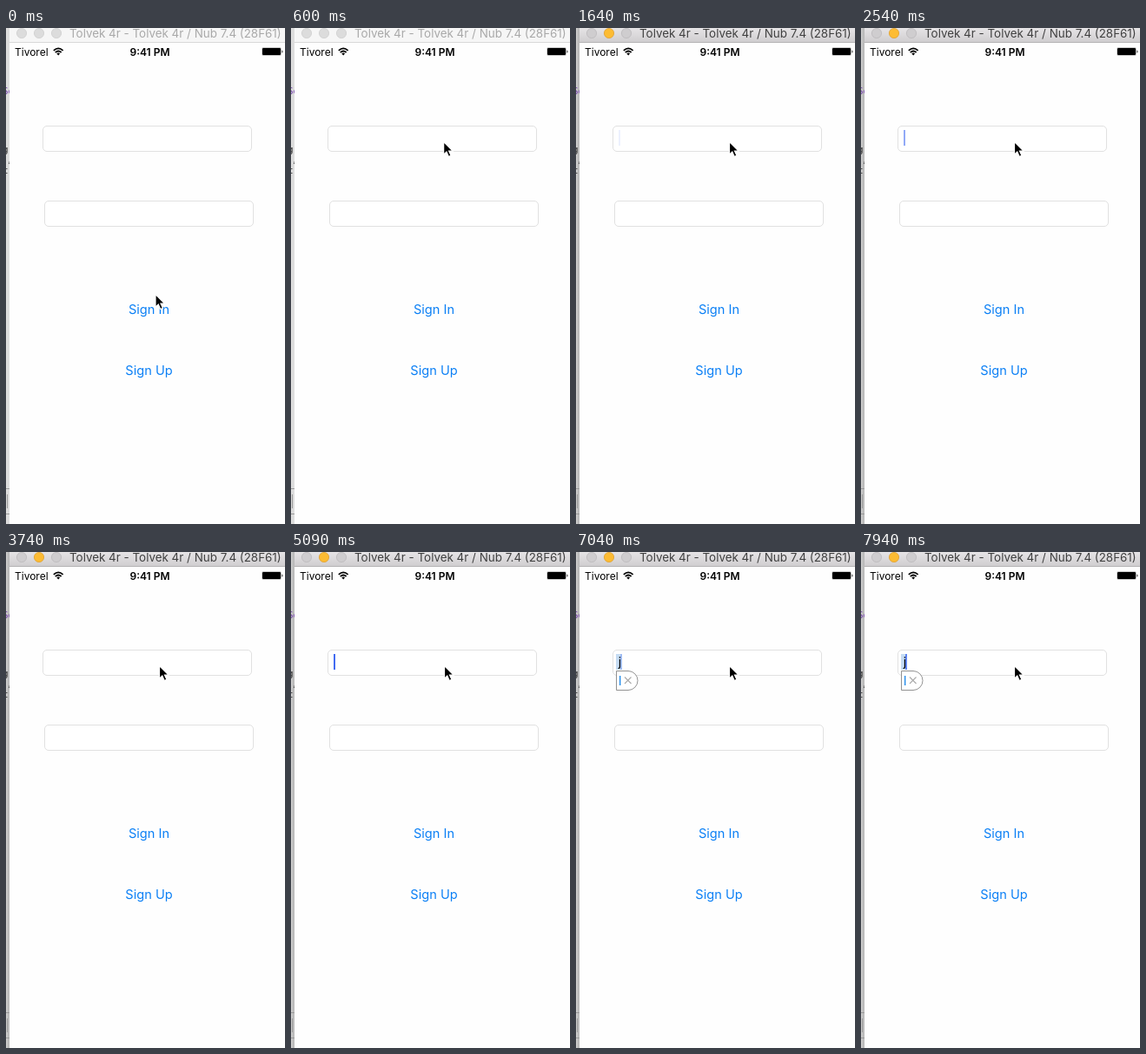
Write an HTML page that moves like this. It is 321 by 569 pixels and loops after 8 s.

```html
<!DOCTYPE html>
<html lang="en">
<head>
<meta charset="utf-8">
<title>Sign in form</title>
<style>
  html, body { margin: 0; width: 100%; height: 100%; overflow: hidden; background: #fff; }
  svg { display: block; width: 321px; height: 569px; }
  text { font-family: Inter, Roboto, sans-serif; }
  .field { fill: #fff; stroke: #e1e1e1; }
  .link { font-size: 14.6px; fill: #0a7ff5; text-anchor: middle; }
  .code { font: 11px "DejaVu Sans Mono", monospace; fill: #222; }

  #back { fill: #dcdcdc; }
  #title { fill: #f6f6f6; }
  #edge { stroke: #d8d8d8; }
  #name { fill: #a9a9a9; }
  #lights { fill: #dcdcdc; stroke: #cfcfcf; stroke-width: .8; }
  .active #back { fill: url(#shade); }
  .active #title { fill: url(#bar); }
  .active #edge { stroke: #b5b3b5; }
  .active #name { fill: #404040; }
  .active #lights { fill: #cfcdcf; stroke: #bbb9bb; }
  .active #mini { fill: #fdbc33; stroke: #e0a030; }
</style>
</head>
<body>
<svg id="stage" viewBox="0 0 321 569">
  <defs>
    <linearGradient id="bar" x2="0" y2="1">
      <stop stop-color="#e6e4e6"/><stop offset="1" stop-color="#d0ced0"/>
    </linearGradient>
    <linearGradient id="shade">
      <stop stop-color="#cdcdcd"/><stop offset="1" stop-color="#b4b4b4"/>
    </linearGradient>
  </defs>

  <!-- window behind -->
  <rect id="back" width="4" height="569"/>
  <text class="code" x="-4" y="76" style="fill:#703daa">Se</text>
  <text class="code" x="-4" y="143">g</text>
  <text class="code" x="1" y="155">,</text>
  <text class="code" x="-4" y="167">t</text>
  <path d="M0 528.5H4M0 557.5H4M1.5 535V551" stroke="#999" fill="none"/>

  <!-- simulator window -->
  <rect x="4" y="16" width="317" height="553" fill="#fefefe"/>
  <rect id="title" x="4" width="317" height="16"/>
  <path id="edge" d="M4 16.5H321"/>
  <g id="lights">
    <circle cx="18" cy="6" r="5.6"/>
    <circle id="mini" cx="38" cy="6" r="5.6"/>
    <circle cx="58" cy="6" r="5.6"/>
  </g>
  <text id="name" x="73" y="11" font-size="13.4">Tolvek 4r - Tolvek 4r / Nub 7.4 (28F61)</text>

  <!-- status bar -->
  <text x="10" y="31.5" font-size="12">Tivorel</text>
  <g fill="none" stroke="#000" stroke-width="1.7">
    <path d="M54.8 25.8Q60.2 20.8 65.6 25.8M56.8 28Q60.2 25 63.6 28"/>
    <path d="M58.3 29.2Q60.2 27.7 62.1 29.2L60.2 31.6Z" fill="#000" stroke="none"/>
  </g>
  <text x="165.5" y="31.5" font-size="12" font-weight="600" text-anchor="middle">9:41 PM</text>
  <rect x="294.5" y="22.5" width="22" height="9" rx="1.5" fill="#fff" stroke="#aaa" stroke-width=".6"/>
  <rect x="295" y="23" width="21" height="8" rx="1"/>
  <path d="M317.5 25.2Q319.4 27 317.5 28.8Z"/>

  <rect class="field" x="42.5" y="112.5" width="240" height="29" rx="4.5"/>
  <rect class="field" x="44.5" y="198.5" width="240" height="29" rx="4.5"/>
  <text class="link" x="164.5" y="328">Sign In</text>
  <text class="link" x="164.5" y="398">Sign Up</text>

  <g id="typed">
    <rect x="46" y="117" width="7" height="18" fill="#c5dcf3"/>
    <text x="48.8" y="131" font-size="14">j</text>
    <path d="M46.5 136.5H60A11 11 0 0 1 60 158.5H46.5Z" fill="#fff" stroke="#777" stroke-width=".8"/>
    <path d="M50.7 142V153" stroke="#1684e8" stroke-width="1.3"/>
    <path d="M56 143.5L63.5 151M63.5 143.5L56 151" stroke="#aaa" stroke-width="1.1"/>
  </g>
  <rect id="caret" y="117" width="2" height="18" fill="#426bf2"/>

  <g id="mouse">
    <path id="arrow" d="M0 0V14.6L3.3 11.5L5.7 17L8.4 15.8L6 10.6H10.5Z" stroke="#fff" stroke-width="1.2"/>
  </g>
</svg>
<script>
  const LOOP = 8000, STEP = 150, ACTIVE = 740, FOCUS = 1040, TYPED = 6440;
  const BLINK = 1005, RESTART = 6480;
  const $ = id => document.getElementById(id);
  const clamp = v => Math.min(1, Math.max(0, v));
  const smooth = v => v * v * (3 - 2 * v);

  // The screen refreshes every STEP ms, counted anew once the window is active.
  function snap(t) {
    const base = t < ACTIVE ? 0 : ACTIVE;
    return base + Math.floor((t - base) / STEP) * STEP;
  }

  // Solid, fade out, hidden, fade in.
  function caretOpacity(t) {
    if (t < FOCUS) return 0;
    const phase = (t - (t < RESTART ? FOCUS : RESTART)) % BLINK;
    return clamp(Math.max((620 - phase) / 215, (phase - 905) / 100));
  }

  function draw(time) {
    const t = snap(time), typed = t >= TYPED;
    const x = 172 + 4.5 * clamp(t / ACTIVE);
    const y = 305.5 - 175 * smooth(clamp(t / 600));
    $("stage").classList.toggle("active", t >= ACTIVE);
    $("mouse").setAttribute("transform", `translate(${x} ${y})`);
    $("typed").setAttribute("opacity", clamp((t - TYPED + STEP) / (2 * STEP)));
    $("caret").setAttribute("x", typed ? 51 : 49);
    $("caret").setAttribute("opacity", caretOpacity(t));
  }

  const start = performance.now();
  function tick() {
    draw((performance.now() - start) % LOOP);
    requestAnimationFrame(tick);
  }
  tick();
</script>
</body>
</html>
```
